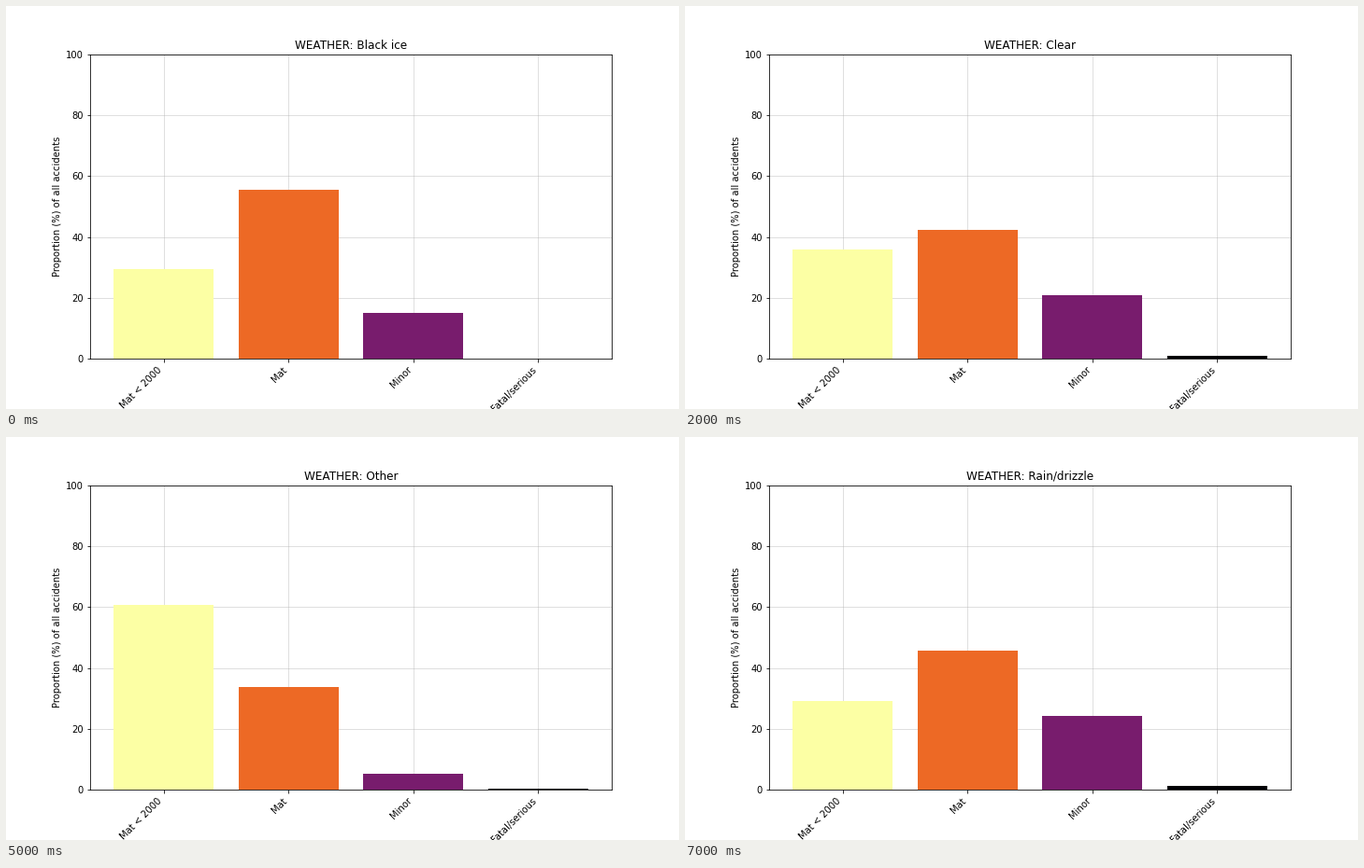
These frames come from a looping animation (720x432 px, 8000 ms). A matplotlib script:

```python
import matplotlib.pyplot as plt
from matplotlib.animation import FuncAnimation

SEVERITY = ["Mat < 2000", "Mat", "Minor", "Fatal/serious"]
COLORS = ["#fcffa4", "#ed6925", "#781c6d", "#000004"]

# Share of accidents per severity (%), one entry per weather type
WEATHER = [
    ("Black ice", (29.5, 55.5, 15.0, 0)),
    ("Blowing snow", (34.0, 49.0, 16.4, 0.6)),
    ("Clear", (35.9, 42.3, 20.9, 0.9)),
    ("Downpour", (28.0, 45.5, 25.2, 1.3)),
    ("Fog/haze", (31.9, 48.5, 19.6, 0)),
    ("Other", (60.7, 33.7, 5.2, 0.4)),
    ("Overcast", (32.1, 48.1, 18.9, 0.9)),
    ("Rain/drizzle", (29.1, 45.6, 24.1, 1.2)),
]

fig, ax = plt.subplots(figsize=(10, 6), dpi=72)
fig.subplots_adjust(left=0.125, right=0.9, bottom=0.125, top=0.88)

bars = ax.bar(range(4), [0] * 4, color=COLORS)
ax.set_xlim(-0.59, 3.59)
ax.set_ylim(0, 100)
ax.set_axisbelow(True)
ax.grid(alpha=0.5)
ax.set_xticks(range(4), SEVERITY, rotation=45, ha="right")
ax.set_ylabel("Proportion (%) of all accidents")
title = ax.set_title("")


def draw(i):
    name, shares = WEATHER[i]
    title.set_text(f"WEATHER: {name}")
    for bar, share in zip(bars, shares):
        bar.set_height(share)
    return [title, *bars]


anim = FuncAnimation(fig, draw, frames=len(WEATHER), interval=1000,
                     init_func=lambda: draw(0), repeat=True, blit=False)
plt.show()
```
